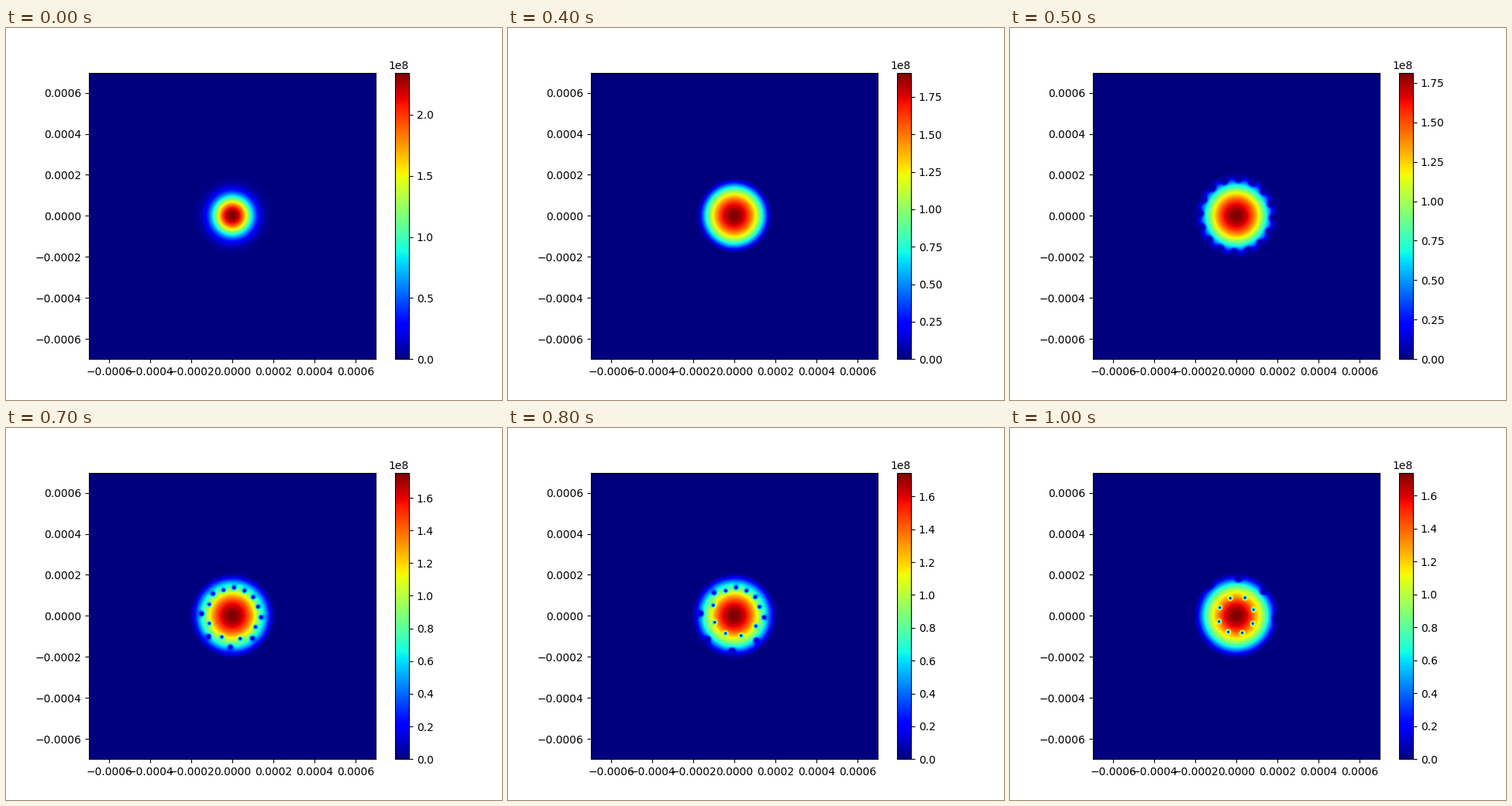
Animation of 640 by 480 pixels, one loop 1.1 s. Source, as a matplotlib script:

```python
import numpy as np
import matplotlib.pyplot as plt
from matplotlib.animation import FuncAnimation

FRAMES, STEP_MS = 11, 100
GRID = 400
HALF = 7e-4 * (1 - 1 / GRID)    # outermost cell centres of the field
PX = 2 * HALF / 369.6           # field units per screen pixel

VORTICES = 16
RING, INNER_RING = 35.5, 23.5   # radii in screen pixels
RING_FORMS = 6                  # step at which the vortex ring is complete

axis = np.linspace(-HALF, HALF, GRID) / PX
x, y = np.meshgrid(axis, axis)
radius = np.hypot(x, y)


def peak_density(t):
    """Gaussian start, steady state, then decay once the trap rotates."""
    if t == 0:
        return 2.345e8
    return 1e8 * (1.912 if t <= 4 else 1.739 + 0.173 * np.exp(-(t - 4) * 0.82))


def cloud(t):
    """Relative density of the cloud without vortices."""
    if t == 0:
        return np.exp(-(radius / 25) ** 2.4)
    edge = np.interp(t, [4, 5, 6, 10], [46, 48.5, 49, 48])
    r2 = radius ** 2
    if t > 4:
        # the flow outside the vortex ring flattens the profile
        ring = np.interp(t, [6, 10], [RING, INNER_RING])
        r2 = r2 - 0.2 * np.maximum(r2 - ring ** 2, 0)
    soft = 0.06
    return soft * np.logaddexp(0, (1 - r2 / edge ** 2) / soft)


def vortex_positions(t):
    """Even vortices sink to an inner ring, odd ones escape outwards."""
    for i in range(VORTICES):
        angle = np.radians(109 - 360 / VORTICES * i)
        s = t - RING_FORMS
        if s < 0:
            r = RING - 10.5 * s             # still entering from the rim
        else:
            lead = (1 - np.cos(angle - np.pi / 3)) / 2
            spread = 5 * s * lead + 5 * max(0, s - 2)
            r = RING + spread if i % 2 else max(INNER_RING, RING - spread)
        yield r * np.cos(angle), r * np.sin(angle)


def density(t):
    base = cloud(t)
    field = base.copy()
    if t > 4:
        core = 4 / np.clip(base, 0.1, 1)
        for vx, vy in vortex_positions(t):
            field *= 1 - np.exp(-((x - vx) ** 2 + (y - vy) ** 2) / core)
    return field * peak_density(t) / field.max()


fig, ax = plt.subplots(figsize=(6.4, 4.8), dpi=100)
image = ax.imshow(density(0), cmap="jet", origin="lower",
                  extent=(-HALF, HALF, -HALF, HALF))
fig.colorbar(image, ax=ax)


def update(t):
    image.set_data(density(t))
    image.set_clim(0, peak_density(t))
    return [image]


anim = FuncAnimation(fig, update, frames=FRAMES, interval=STEP_MS,
                     repeat=True, repeat_delay=0, blit=False)
plt.show()
```
